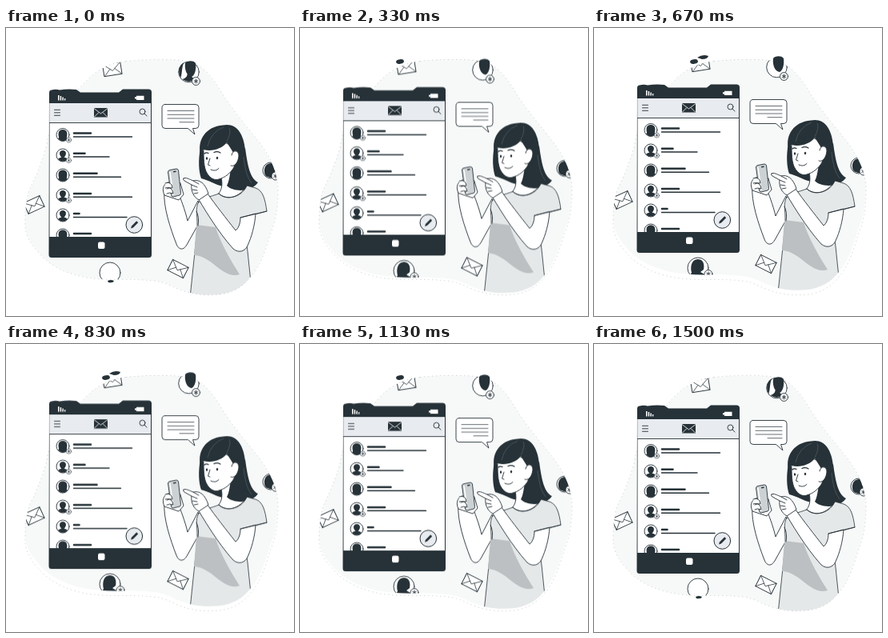
Write an HTML page that moves like this. It is 360 px wide and 360 px high and loops after 1.54 s.

```html
<!DOCTYPE html>
<html lang="en">
<head>
<meta charset="utf-8">
<title>Mail on a phone</title>
<style>
html, body { margin: 0; width: 100%; height: 100%; overflow: hidden; background: #fff; }
svg { display: block; width: 100vw; height: 100vh; }
.ink { fill: #263238; }
.line { fill: none; stroke: #263238; stroke-width: .9; stroke-linecap: round; stroke-linejoin: round; }
.paper { fill: #fff; stroke: #263238; stroke-width: .9; stroke-linejoin: round; stroke-linecap: round; }
.thin { stroke-width: .7; }
.bold { stroke-width: 1.3; }
.bob { animation: bob 1540ms cubic-bezier(.37, 0, .63, 1) infinite; }
.low, .lift, .peak { animation: 1540ms step-end infinite; }
.low { animation-name: low; }
.lift { animation-name: lift; }
.peak { animation-name: peak; }
@keyframes bob { 0%, 97.4%, 100% { transform: none; } 47.4% { transform: translateY(-6.1px); } }
@keyframes lift { 0%, 76% { visibility: hidden; } 19% { visibility: visible; } }
@keyframes low { 0%, 76% { visibility: visible; } 19% { visibility: hidden; } }
@keyframes peak { 0%, 58% { visibility: hidden; } 36% { visibility: visible; } }
</style>
</head>
<body>
<svg viewBox="0 0 360 360">
<defs>
  <path id="blob" d="M150 41.500C172 39 210 38 230 42C247 47 258 62 268 78C280 99 302 124 316 142C331 162 340 180 340 203C340 226 337 242 331 256C325 275 319 297 306 311C296 324 283 331 268 333C248 335 232 333 217 327C205 322 197 317 184 316C158 313 133 316 108 313C82 310 55 299 40 280C28 267 23 256 24 240C24 223 26 209 31 198C38 185 44 169 50 150C54 125 60 105 92 75C105 60 120 45 150 41.500Z"/>
  <clipPath id="inside"><use href="#blob"/></clipPath>
  <clipPath id="screen"><path d="M54 94H181V261H54Z"/></clipPath>

  <g id="mail">
    <path class="paper" d="M-11 -7.5H11V7.5H-11Z"/>
    <path class="line thin" d="M-11 -7.5L0 2L11 -7.5M-11 7.5L-3 -.5M11 7.5L3 -.5"/>
  </g>
  <g id="badge">
    <circle class="paper" r="5"/>
    <path class="line" d="M0 -2.6V2.6M-2.3 -1.3L2.3 1.3M-2.3 1.3L2.3 -1.3"/>
  </g>
  <circle id="ring" class="paper" r="8"/>
  <path id="girl" class="ink" d="M-4.800 3.500C-6 -1 -6 -6.500 0 -6.500C6 -6.500 6 -1 4.800 3.500L6 5Q0 10.500 -6 5Z"/>
  <path id="boy" class="ink" d="M-1.500 2.500C-5 0 -5 -6 0 -6C5 -6 5 0 1.500 2.500Q5 3 6 5Q0 10.500 -6 5Q-5 3 -1.500 2.500Z"/>
  <use id="tag" href="#badge" transform="translate(7.5 6.5) scale(.62)"/>
</defs>

<g clip-path="url(#inside)">
  <g class="bob"><g clip-path="url(#inside)">
    <use href="#blob" fill="#f7f9f9"/>

    <!-- floating icons -->
    <use href="#mail" transform="translate(133 51.5) rotate(-9)"/>
    <use href="#mail" transform="translate(35 221) rotate(-25)"/>
    <use href="#mail" transform="translate(215 301) rotate(27)"/>
    <g transform="translate(228.5 55)">
      <circle class="paper" r="12.800"/>
      <g class="ink low">
        <path d="M-6 -12C-13 -8 -14 1 -10 7C-8 0 -9 -6 -6 -12Z"/>
        <path d="M-2 3H3Q3 7 8 9Q0 15 -8 9Q-2 7 -2 3Z"/>
      </g>
      <use href="#badge" x="9" y="11.5"/>
    </g>
    <g transform="translate(331 178)">
      <circle class="paper" r="10"/>
      <path class="ink" d="M-8 2C-9 -8 -1 -11 5 -8L9 -2L8 3L2 5L1 9C-4 9 -8 7 -8 2Z"/>
      <use href="#badge" x="6" y="7"/>
    </g>
    <g transform="translate(130 306)">
      <circle class="paper" r="13"/>
      <g class="lift">
        <path class="ink" d="M-8 6C-10 -2 -8 -11 0 -11C8 -11 8 -2 7 2L3 5L10 9Q0 15 -10 9Z"/>
        <use href="#badge" x="13" y="7.5"/>
      </g>
    </g>

    <!-- speech bubble -->
    <path class="paper" d="M199 95.500H237Q241 95.500 241 99.500V121.500Q241 125.500 237 125.500H233.500L236 133L227.500 125.500H199Q195 125.500 195 121.500V99.500Q195 95.500 199 95.500Z"/>
    <path class="line thin" d="M202 103.500H235M202 108.300H235M202 113H235M217 117.700H235"/>

    <!-- woman -->
    <path class="ink" d="M243 150C240 165 241 180 244 188C253 190 262 196 271 198L276 180Z"/>
    <path class="paper" d="M269 186C271 196 270 203 264 209L278 224L305 200L284 179Z"/>
    <path class="ink" d="M282 168C280 183 279 192 276 197C283 205 306 206 315 193C305 188 302 172 299 150Z"/>
    <path class="paper" d="M247 149C247 163 247 174 251 181C255 188 261 191 266 189C274 187 281 181 285 174L288 150L265 139Z"/>
    <path class="ink" d="M243 157C239 140 250 123 271 121.500C288 118 297 132 299 152L290 173C288 160 281 151 276 143C270 151 257 155 247 152Z"/>
    <path fill="none" stroke="#667177" stroke-width=".5" d="M272 124Q256 130 252 148M276 142Q282 130 279 125M297 161Q299 184 307 194"/>
    <path class="paper" d="M282 159C283 152 291 152 291 160C290 169 285 174 281 172"/>
    <path class="line bold" d="M248 157Q250 155 253 156.500M260 155.500Q264 153.500 268 156"/>
    <ellipse class="ink" cx="251" cy="163" rx="1.200" ry="1.800"/>
    <ellipse class="ink" cx="264" cy="162.500" rx="1.200" ry="1.800"/>
    <path class="line" d="M255 163L252.500 171L255 172M256 177Q262 180 266 175.500"/>

    <path class="paper" d="M198 204C196 223 206 252 213 270C216 278 222 278 226 271L246 235L240 216L227 241C224 228 218 212 215 206Z"/>
    <path fill="#e5e8e9" stroke="#263238" stroke-width=".8" d="M266 207C256 211 246 212 240 219C236 229 241 238 238 261L230 337H308L302 279L296 237L326 229C324 214 321 203 312 200L301 197C296 210 278 217 266 207Z"/>
    <path fill="#bcc0c2" d="M238 246L262 249C268 268 280 289 292 308C280 312 269 303 258 294C250 288 242 284 235 284Z"/>
    <path class="paper" d="M236 206C247 225 265 255 284 276C291 282 299 279 302 272C307 261 311 247 312 232L293 237C293 245 290 251 287 253C276 239 261 220 252 207Z"/>
    <path class="line" d="M293 237L326 229M266 207C276 217 293 211 301 197M238 229Q242 237 240 247"/>

    <!-- phone in hand -->
    <path class="paper" d="M202 193C196 196 195 202 198 209L216 215L222 208L218 194Z"/>
    <path fill="#ccd1d3" stroke="#263238" stroke-width=".9" d="M205 177.500L213 176Q215 176 215.500 178L218.500 206.500Q218.500 208.500 217 209L209 211Q207 211 206.500 209L202.500 180Q202.500 178 205 177.500Z"/>
    <path stroke="#fff" stroke-width="1.500" d="M205 180L209 209"/>
    <path class="ink" d="M209 179L212.500 178.400V180L209.300 180.600Z"/>
    <path class="paper" d="M199 194Q204 192 207 196L208 200Q204 199 201 201M199 200Q205 198 208 203L209 207Q204 205 201 207"/>
    <path class="paper" d="M222 188C224 186 229 189 234 191C242 189 249 194 253 207L241 215C234 211 231 203 232 196L223 191Q221 190 222 188Z"/>
    <path class="line" d="M234 191L241 195M232 196L239 199M233 202L239 203M235 207L240 206"/>
  </g></g>
</g>

<!-- dark edge fragments -->
<use href="#blob" fill="none" stroke="#263238" stroke-width=".5" stroke-dasharray="1.5 3.5" opacity=".35"/>
<g class="ink">
  <ellipse class="lift" cx="125" cy="42" rx="5" ry="2.800" transform="rotate(-10 125 42)"/>
  <path class="peak" d="M129 37Q136 32 143 35Q142 39 135 39Z"/>
  <path class="low" d="M127 316Q131 314 135 316Q134 319 128 318Z"/>
  <path class="bob" d="M224 44C226 41 234 40 237 44C238 52 236 59 232 61C226 60 223 53 224 44Z"/>
</g>

<!-- large phone -->
<g class="bob">
  <path class="ink" d="M54 81Q54 77.500 57 77.500Q62 76 67 77.500Q77 76 88 77L93 80.500H141L146 76.500H178Q182 76.500 182 80V283.500Q182 287 178.500 287H57Q53.500 287 53.500 283.500Z"/>
  <path fill="#fff" d="M65 84H66.500V90.500H65ZM67.700 85H69.200V90.500H67.700ZM70.400 86.500H71.900V90.500H70.400ZM73 88H74.300V90.500H73ZM163 84.800H172.500V90H163ZM161 86.300H163V88.500H161Z"/>
  <path fill="#fff" d="M54.500 94H181V261H54.500Z"/>
  <path fill="#e8ebef" d="M54.500 94H181V118H54.500Z"/>
  <path class="line" d="M54.500 118.500H181M60.500 102.300H67.500M60.500 105.800H67.500M60.500 109.300H67.500"/>
  <path class="ink" d="M110 100H127V111.500H110Z"/>
  <path fill="none" stroke="#fff" stroke-width=".8" d="M110 100.500L118.500 107L127 100.500M110.500 111L116 105.500M126.500 111L121 105.500"/>
  <circle class="line" cx="170.500" cy="104.500" r="3.500"/>
  <path class="line" d="M173 107L176 110"/>

  <g clip-path="url(#screen)">
    <g transform="translate(71 133.500)"><use href="#ring"/><use href="#girl"/><use href="#tag"/></g>
    <g transform="translate(71 159)"><use href="#ring"/><use href="#boy"/><use href="#tag"/></g>
    <g transform="translate(71 184)"><use href="#ring"/><use href="#girl"/></g>
    <g transform="translate(71 209)"><use href="#ring"/><use href="#boy"/><use href="#tag"/></g>
    <g transform="translate(71 234)"><use href="#ring"/><use href="#boy"/></g>
    <g transform="translate(71 259)"><use href="#ring"/><use href="#girl"/></g>
    <path class="line" style="stroke-width:2.600" d="M85 131.500H106M85 156.700H98.500M85 181.800H113.500M85 207H106M85 232H91.500M85 257H106"/>
    <path class="line" style="stroke-width:1.400" d="M84.500 136H157.500M84.500 161H129M84.500 186.300H143.500M84.500 211.300H157.500M84.500 236.500H151"/>
  </g>

  <circle cx="160.300" cy="246" r="10.300" fill="#e8ebef" stroke="#263238"/>
  <path class="ink" d="M156 250.500L157 247.500L163.200 241.300L165.200 243.300L159 249.500Z"/>
  <rect x="115" y="267.500" width="8.500" height="8.500" rx="2" fill="#fff"/>
</g>
</svg>
</body>
</html>
```
